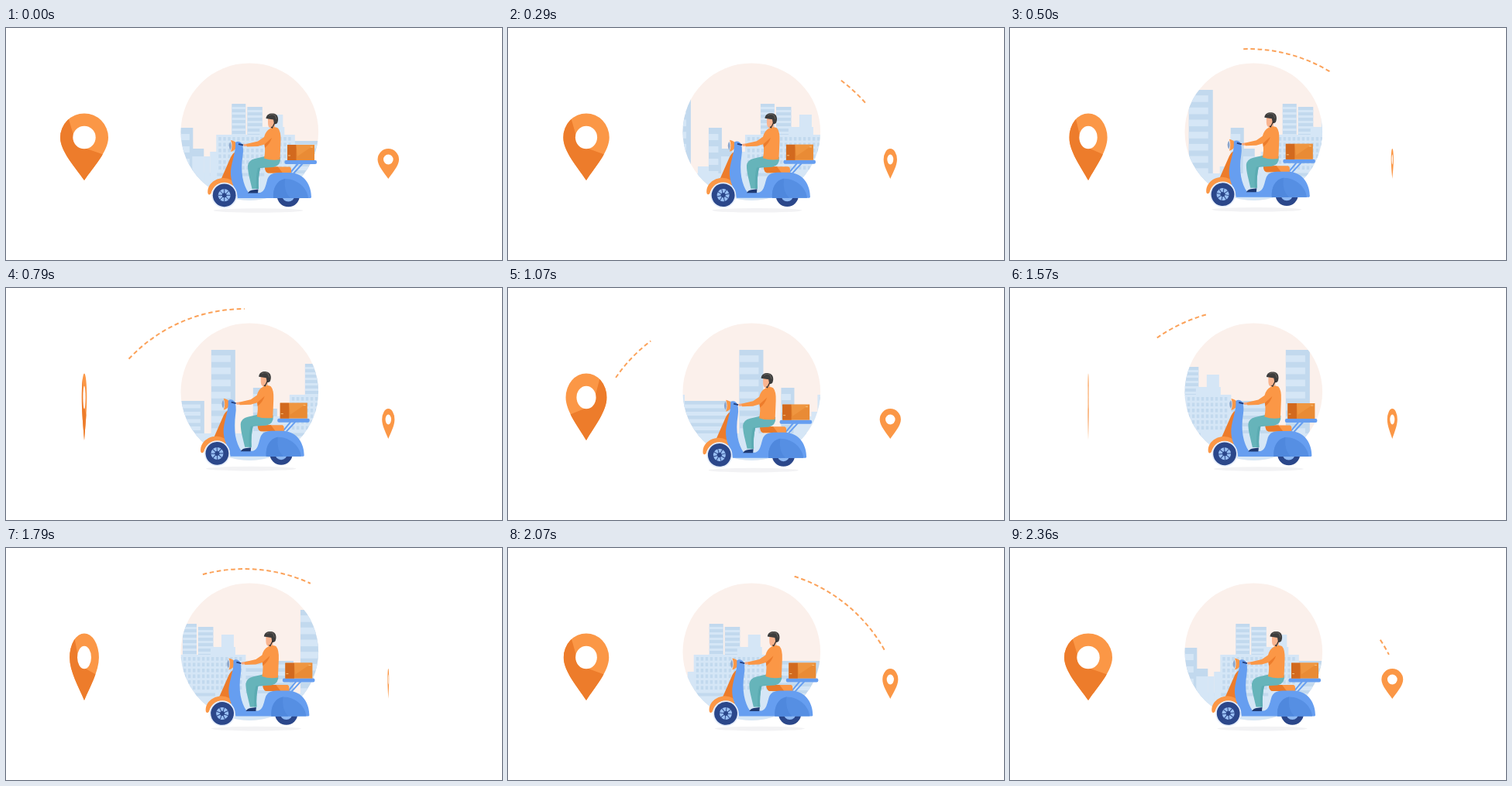
Write an HTML page that moves like this. It is 640 px wide and 300 px high and loops after 2.43 s.

```html
<!DOCTYPE html>
<html lang="en">
<head>
<meta charset="utf-8">
<title>Scooter delivery</title>
<style>
  html, body { margin: 0; width: 100%; height: 100%; overflow: hidden; background: #fff; }
  svg { display: block; width: 640px; height: 300px; }
</style>
</head>
<body>
<svg viewBox="0 0 640 300">
  <defs>
    <clipPath id="disc"><circle cx="314.3" cy="134.2" r="88.8"/></clipPath>
    <path id="drop" d="M0 55.500C-12 38-31 18-31 0A31 31 0 0 1 31 0C31 18 12 38 0 55.500Z"/>
    <clipPath id="dropClip"><use href="#drop"/></clipPath>
    <path id="arc" pathLength="420" d="M139 116A204 204 0 0 1 489 138" fill="none"/>
    <mask id="trim" maskUnits="userSpaceOnUse" x="0" y="0" width="640" height="300">
      <use id="window" href="#arc" stroke="#fff" stroke-width="6"/>
    </mask>
    <g id="tile"></g>
  </defs>

  <g clip-path="url(#disc)">
    <rect x="225" y="45" width="180" height="180" fill="#fbf0eb"/>
    <g id="city">
      <use href="#tile"/>
      <use href="#tile" x="-273"/>
      <use href="#tile" x="-546"/>
    </g>
  </g>

  <g mask="url(#trim)">
    <use id="dashes" href="#arc" stroke="#fba25a" stroke-width="2" stroke-dasharray="5.6 3.6"/>
  </g>

  <g id="bigPin">
    <use href="#drop" fill="#fb9746"/>
    <path d="M-22-30L-10 10L30 24V60H-40V-30Z" fill="#ed7c2b" clip-path="url(#dropClip)"/>
    <circle r="14.7" fill="#fff"/>
  </g>
  <g id="smallPin">
    <use href="#drop" fill="#fb9746"/>
    <circle r="14.2" fill="#fff"/>
  </g>

  <g id="scooter">
    <ellipse cx="325.5" cy="236" rx="58" ry="2.8" fill="#f2f2f4"/>
    <!-- rear wheel -->
    <circle cx="364.3" cy="216.5" r="14.7" fill="#2b478a"/>
    <circle cx="364.3" cy="216.5" r="8" fill="#8db8f3"/>
    <!-- rack and box -->
    <path d="M367 187L377 175M371 188L383 175" stroke="#669ef0" stroke-width="2"/>
    <rect x="359.5" y="171" width="41.5" height="5" rx="2" fill="#669ef0"/>
    <rect x="363" y="151" width="35" height="20" fill="#e98b35"/>
    <rect x="363" y="151" width="11.5" height="20" fill="#d2691e"/>
    <path d="M374.5 151H398L376 166Z" fill="#ef9640"/>
    <path d="M364 165h3M393 154h3" stroke="#f8c27a"/>
    <!-- seat -->
    <path d="M334 179.5H366Q368 180 368 183V187.5H338Q334 186 334 179.5Z" fill="#fb9746"/>
    <path d="M334 179.5H351L357 187.5H338Q334 186 334 179.5Z" fill="#e97a29"/>
    <!-- front column, fender and lamp -->
    <path d="M276 199L290 167Q293 161 297 160L294 204Z" fill="#ed7c2b"/>
    <path d="M260.5 214C259 203 269 194 281 194Q292 194 297 204L281 200Q268 201 264.5 214Q262 217 260.5 214Z" fill="#fb9746"/>
    <path d="M290 145Q296 146 299 151Q296 159 290 160Q293 152 290 145Z" fill="#fb9746"/>
    <path d="M289.5 147Q286 152 289.5 158Q292 153 289.5 147Z" fill="#8aa5cc"/>
    <!-- body -->
    <path d="M296 148Q300 145 304 149Q307 154 305.5 165C302 186 306 203 313 213H328C334 211 335 204 337 197Q339 187 352 187H366C386 188 394 204 394 219L393 220H299C297 209 291 203 290 190C289 176 297 163 296 148Z" fill="#669ef0"/>
    <path d="M345 220C344 208 349 197 360 195C377 195 389 208 390 220Z" fill="#568fe3"/>
    <path d="M345 220C344 208 349 197 360 195Q358 212 367 220Z" fill="#4f88dd"/>
    <path d="M300 150L306 151.5" stroke="#243f7d" stroke-width="2"/>
    <!-- front wheel -->
    <circle cx="281.7" cy="216.3" r="16.6" fill="#e6eefb"/>
    <g id="wheel">
      <circle r="14.9" fill="#2b478a"/>
      <circle r="8" fill="#98bff3"/>
      <path d="M-8 0H8M0-8V8M-5.7-5.7L5.7 5.7M-5.7 5.7L5.7-5.7" stroke="#2b478a"/>
      <circle r="3" fill="#2b478a"/>
    </g>
    <!-- rider -->
    <path d="M354 167Q355 178 345 180L328 181Q325 194 326 208H317.5C315 196 312 188 312 178Q313 171 321 169L334 166Z" fill="#66b4ba"/>
    <path d="M328 181Q325 194 326 208H323Q322 190 325 181L340 178Z" fill="#5babb2"/>
    <path d="M312 213.5Q314 210 318 209.5L325.5 208.5L325 213.5Z" fill="#1f3a73"/>
    <path d="M306 150.5Q309 149 313 150.5L312 153L307 153Z" fill="#f6a77e"/>
    <path d="M338 117H347V131Q343 133 341 129.5Q338 128 338 123Z" fill="#f9b48f"/>
    <path d="M341 130Q346 127 351 129.5Q355 134 354.5 146L353.5 170Q343 172 333 168.5Q335 158 333.5 150.5L325 153L311 153.5L310 150L325 146.5L333 141Q335 133 341 130Z" fill="#fb9746"/>
    <path d="M333.5 150.5L343 142Q341 149 334 155Z" fill="#ed7c2b"/>
    <path d="M335.5 117C336 111 341 110 345 110.5C351 111 352.5 118 350 123Q348 125 346 124L345 118.5Z" fill="#3d3d3d"/>
    <path d="M339 113Q343 110.5 347 112.5L349 118" stroke="#66625c" fill="none"/>
    <path d="M347 122L343.5 129L342 128" stroke="#2c2c2c" stroke-width="1.2" fill="none"/>
  </g>
</svg>
<script>
const LOOP = 2430, STEPS = 34, ARC = 420, TILE = 273;
const LIGHT = '#d5e6f6', DARK = '#c2d9ee';
const $ = id => document.getElementById(id);

// One stretch of skyline, repeated every TILE pixels
const rect = (x, y, w, h, fill = LIGHT) =>
  `<rect x="${x}" y="${y}" width="${w}" height="${h}" fill="${fill}"/>`;

function tower(x, y, w, bottom, bandW, bandH, pitch) {
  let s = rect(x, y, w, bottom - y, DARK);
  for (let b = y + pitch - bandH; b + bandH <= bottom; b += pitch) s += rect(x, b, bandW, bandH);
  return s;
}

function office(x, y, w, h) {
  let s = rect(x, y, w, h);
  for (let wy = y + 3; wy < y + 45; wy += 7.5)
    for (let wx = x + 3; wx < x + w - 4; wx += 6) s += rect(wx, wy, 3.4, 4.6, DARK);
  return s;
}

$('tile').innerHTML =
  tower(152, 80, 31, 200, 25, 8.6, 15.7) +
  tower(206, 129, 17, 200, 12.5, 8, 16) +
  tower(222, 156, 15, 200, 15, 30, 40) +
  rect(192, 179, 14, 20) + rect(237, 166, 8, 34) + rect(245, 160, 9, 40) +
  tower(0, 98, 18, 140, 18, 3, 7) +
  tower(20, 102, 19.5, 140, 19.5, 3, 7) +
  rect(50, 112, 16, 20) + rect(36, 128, 32, 12) +
  tower(76, 146, 67, 200, 62, 5, 9.5) +
  office(-20, 138, 101.5, 62) +
  rect(-36, 188, TILE + 1, 40) + rect(-36, 187.5, 78, 4, DARK);

const { sin, cos, PI } = Math;
const clamp = v => Math.min(Math.max(v, 0), 1);
const smooth = v => (v = clamp(v)) * v * (3 - 2 * v);
const place = (id, value) => $(id).setAttribute('transform', value);

function draw(step) {
  const p = step / (STEPS - 1);
  place('city', `translate(${291.3 + TILE * (p + .015 * sin(PI * p))} 0)`);

  const x = -9.4 * sin(PI * p ** .7) ** 2;
  const y = -2.4 * sin(1.5 * PI * smooth(p * 1.22)) ** 2;
  place('scooter', `translate(${x} ${y})`);
  place('wheel', `translate(281.7 216.3) rotate(${-37 * step})`);

  // Pins turn about their upright axis, the big one with easing
  const turn = 2 * PI * step / 33.5;
  place('bigPin', `translate(101 141.5) scale(${cos(turn - .68 * sin(turn))} 1)`);
  place('smallPin', `translate(493.3 170) scale(${.45 * cos(2 * PI * step / STEPS + .16)} .45)`);

  // The dashes run leftwards first, then back
  const half = 16.8, back = step > half, d = step % half;
  const head = ARC * smooth(d / 13.2), tail = ARC * (d / half) ** 1.5;
  const from = back ? tail : ARC - head;
  $('window').setAttribute('stroke-dasharray', `0 ${from} ${Math.max(head - tail, 0)} 999`);
  $('dashes').setAttribute('stroke-dashoffset', -from);
}

let start;
function tick(now) {
  start ??= now;
  draw(Math.floor(((now - start) % LOOP + 6) * STEPS / LOOP) % STEPS);
  requestAnimationFrame(tick);
}
draw(0);
requestAnimationFrame(tick);
</script>
</body>
</html>
```
